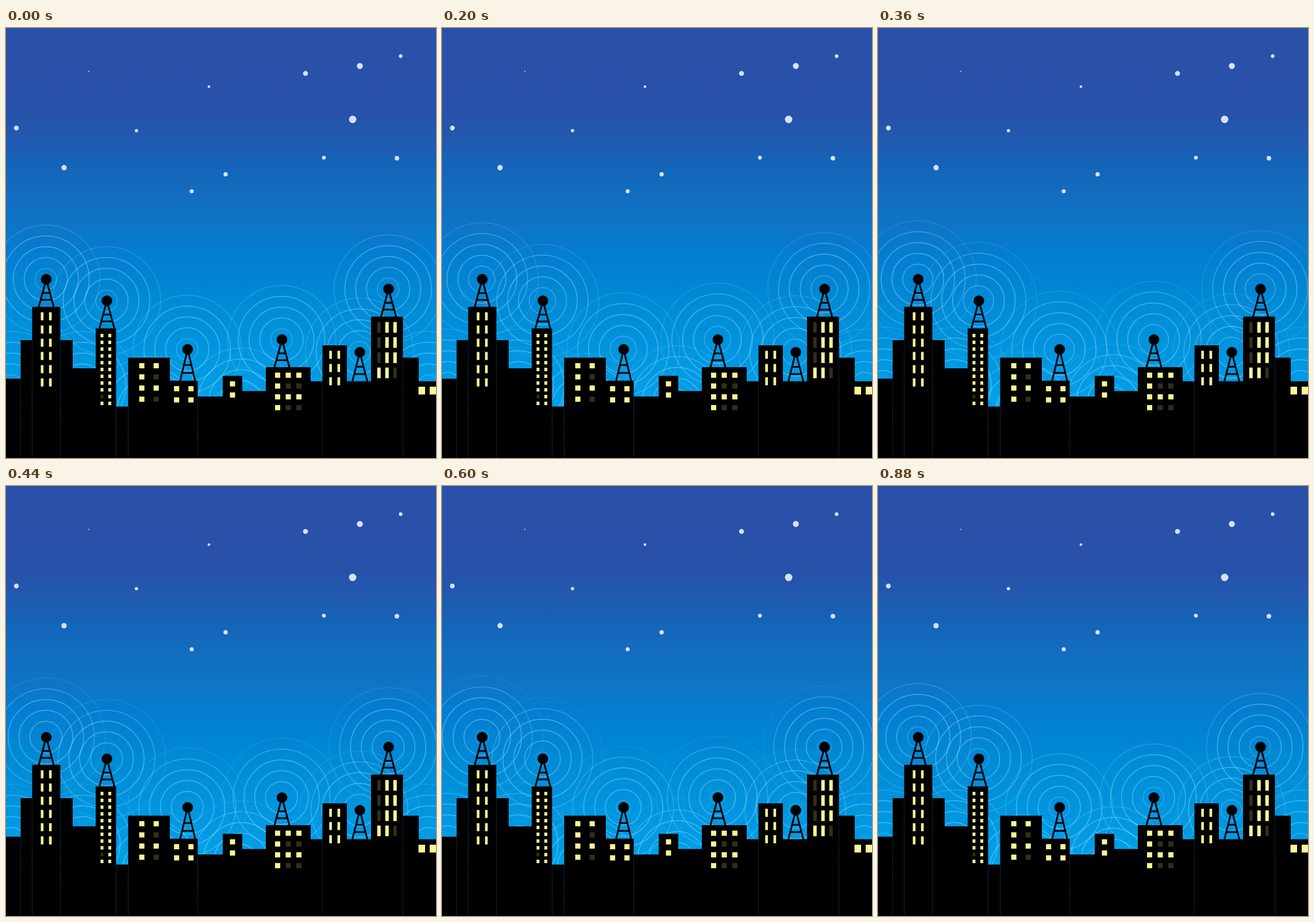
An HTML page that plays this animation: 748 px wide and 748 px high, repeating every 920 ms.

```html
<!DOCTYPE html>
<html lang="en">
<head>
<meta charset="utf-8">
<title>City signals</title>
<style>
  html, body { margin: 0; width: 100%; height: 100%; overflow: hidden; background: #000; }
  svg { display: block; width: 748px; height: 748px; }
  #waves { fill: none; stroke: #a4dcff; stroke-width: 1.5; }
  #waves circle {
    animation: grow 5520ms steps(138) infinite, fade 5520ms linear infinite;
    animation-delay: calc(var(--i) * -920ms);
  }
  #stars { fill: #d5e3fa; }
  #masts { stroke: #000; stroke-width: 3; }
  .lit { fill: #fbf596; }
  .dim { fill: #2f2f1b; }
  @keyframes grow { from { r: 0px; } to { r: 113px; } }
  @keyframes fade {
    0% { stroke-opacity: 0; }
    10% { stroke-opacity: .2; }
    25%, 66% { stroke-opacity: .44; }
    100% { stroke-opacity: 0; }
  }
</style>
</head>
<body>
<svg viewBox="0 0 748 748">
  <defs>
    <linearGradient id="sky" gradientUnits="userSpaceOnUse" x1="0" y1="0" x2="0" y2="660">
      <stop offset="0" stop-color="#2a51a8"/>
      <stop offset=".22" stop-color="#2851a9"/>
      <stop offset=".3" stop-color="#205bb1"/>
      <stop offset=".36" stop-color="#1464b8"/>
      <stop offset=".41" stop-color="#146abc"/>
      <stop offset=".53" stop-color="#0d76c7"/>
      <stop offset=".59" stop-color="#047dd0"/>
      <stop offset=".72" stop-color="#008ad5"/>
      <stop offset="1" stop-color="#00a2ea"/>
    </linearGradient>
  </defs>
  <rect width="748" height="748" fill="url(#sky)"/>
  <g id="stars"></g>
  <g id="waves"></g>
  <g id="masts"></g>
  <g id="city"></g>
  <g id="panes"></g>
</svg>
<script>
  const add = (id, tag, attrs) => {
    const el = document.createElementNS('http://www.w3.org/2000/svg', tag);
    for (const k in attrs) el.setAttribute(k, attrs[k]);
    document.getElementById(id).append(el);
  };

  // smallest to largest: even growth, with the two extremes stretched
  const stars = [
    [144, 75.5], [353, 102], [227, 178.5], [686.5, 49], [553, 225.5], [323, 284], [382, 254.5],
    [680, 226.5], [18, 174], [521, 79], [101, 243], [615.5, 66], [603, 159]
  ];
  stars.forEach(([cx, cy], i) => {
    const u = i / 6 - 1;
    add('stars', 'circle', { cx, cy, r: 3.75 + 1.2 * u + 1.5 * u ** 7 });
  });

  const waves = (cx, cy) => {
    for (let i = 0; i < 6; i++) add('waves', 'circle', { cx, cy, style: `--i:${i}` });
  };

  const mast = (x, roof, h = 48) => {
    const y = roof - h;
    const leg = dx => `M${x} ${y}L${x + dx} ${roof}`;
    const rung = f => `M${x - 13 * f} ${y + h * f}h${26 * f}`;
    add('masts', 'path', { d: leg(-13) + leg(13) + rung(.5) + rung(.75) });
    add('masts', 'circle', { cx: x, cy: y, r: 7.8 });
    waves(x - .7, y);
  };

  // pane width and height, then column and row pitch
  const slit = [4.6, 14, 14.3, 23];
  const tall = [6, 18.5, 14, 26.4];
  const tiny = [5, 6, 13.6, 11.8];
  const wide = [9, 9, 25, 19.4];
  const tight = [9, 9, 18.5, 18.8];

  // grid centred under the roof; dim(column, row) picks unlit panes
  const panes = (mid, roof, [width, height, dx, dy], cols, rows, dim = () => false) => {
    for (let r = 0; r < rows; r++)
      for (let c = 0; c < cols; c++)
        add('panes', 'rect', {
          x: mid + (c - (cols - 1) / 2) * dx - width / 2, y: roof + 9.5 + r * dy,
          width, height, class: dim(c, r) ? 'dim' : 'lit'
        });
  };

  // left edge and roof; each block reaches to the next one
  const city = [
    { x: 0, roof: 610 },
    { x: 25.5, roof: 543 },
    { x: 45.5, roof: 485, mast: [70], panes: [slit, 2, 6] },
    { x: 94.5, roof: 543 },
    { x: 116, roof: 592 },
    { x: 156, roof: 522.5, mast: [175.5], panes: [tiny, 2, 11, (c, r) => !c && r === 9] },
    { x: 191.5, roof: 658.5 },
    { x: 212.5, roof: 573.5, panes: [wide, 2, 4, (c, r) => c && r % 2] },
    { x: 285, roof: 613.5, mast: [316, 54.5], panes: [wide, 2, 2] },
    { x: 333.5, roof: 641 },
    { x: 377, roof: 605, panes: [wide, 1, 2] },
    { x: 411, roof: 631.5 },
    { x: 452, roof: 590, mast: [480], panes: [tight, 3, 4, (c, r) => c && r % 2] },
    { x: 530, roof: 614.5 },
    { x: 550.5, roof: 552, panes: [slit, 2, 3] },
    { x: 593, roof: 614.5, mast: [615.5, 50.5] },
    { x: 635, roof: 502, mast: [665.5], panes: [tall, 3, 4, (c, r) => c === (r < 3 ? 0 : 2)] },
    { x: 690.5, roof: 573.5 },
    { x: 718, roof: 614.5, panes: [[11.5, 13.5, 19.5, 0], 2, 1] }
  ];
  city.forEach(({ x, roof, mast: m, panes: p }, i) => {
    const end = city[i + 1]?.x ?? 748;
    add('city', 'path', { d: `M${x} 748V${roof}H${end}V748` });
    if (m) mast(m[0], roof, m[1]);
    if (p) panes((x + end) / 2, roof, ...p);
  });

  // sources behind the skyline
  for (const x of [10, 133, 735]) waves(x, 622);
  waves(250, 665);
  waves(409, 651);
</script>
</body>
</html>
```
